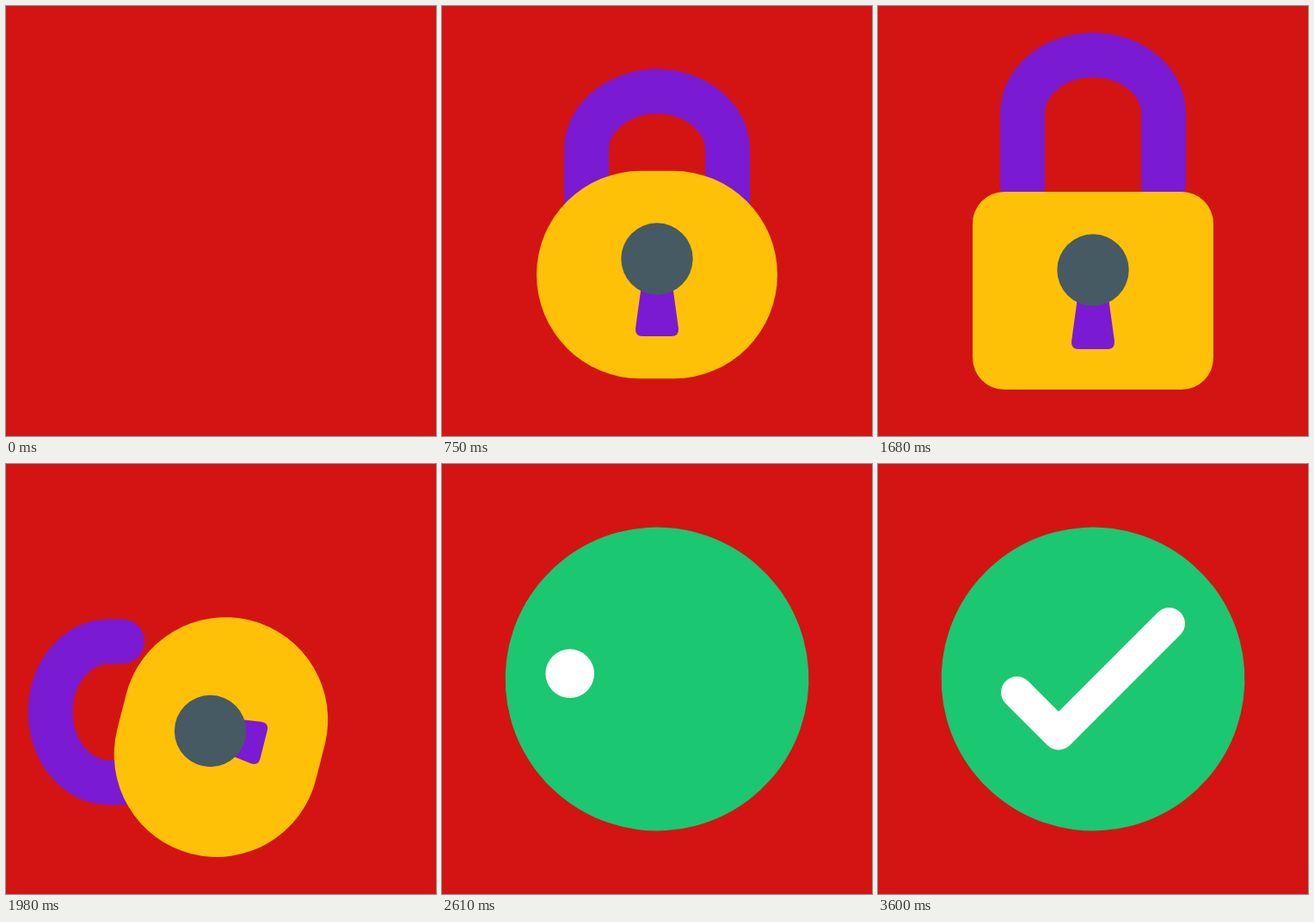
An HTML page that plays this animation: 500 px wide and 500 px high, repeating every 4260 ms.

```html
<!DOCTYPE html>
<html lang="en">
<head>
<meta charset="utf-8">
<title>Unlock</title>
<style>
  html, body { margin: 0; width: 100%; height: 100%; overflow: hidden; background: #d31413; }
  svg { display: block; width: 100%; height: 100%; }
</style>
</head>
<body>
<svg viewBox="0 0 500 500">
  <defs>
    <clipPath id="clip"><rect id="clipRect"/></clipPath>
  </defs>
  <rect width="500" height="500" fill="#d31413"/>
  <circle id="ripple" cx="250" cy="250" fill="#1bc771"/>
  <g id="lock">
    <path id="shackle" d="M-82 85V0A82 68 0 0 1 82 0V85" pathLength="1" fill="none"
          stroke="#7b1ad3" stroke-width="52" stroke-linecap="round"/>
    <rect id="body"/>
    <g clip-path="url(#clip)">
      <path id="glint" d="M15.5 -115H63.5L-15.5 115H-63.5Z" fill="#fff" opacity=".33"/>
    </g>
  </g>
  <path id="slot" d="M-17 25H17L25 83Q25.500 92 17 92H-17Q-25.500 92 -25 83Z" fill="#7b1ad3"/>
  <circle id="hole"/>
  <path id="check" d="M161.500 265.500L210 314L338.500 185.500" pathLength="1" fill="none" stroke="#fff"
        stroke-width="37" stroke-linecap="round" stroke-linejoin="round"/>
</svg>
<script>
const LOOP = 4260;
const YELLOW = [255, 193, 7], GREEN = [27, 199, 113];
const SLATE = [70, 90, 99], WHITE = [255, 255, 255];

const el = {};
document.querySelectorAll('svg [id]').forEach(node => { el[node.id] = node; });

const lerp = (a, b, p) => a + (b - a) * p;
const mix = (a, b, p) => `rgb(${a.map((v, i) => Math.round(lerp(v, b[i], p)))})`;
const set = (node, attrs) => {
  for (const key in attrs) node.setAttribute(key, attrs[key]);
};
const show = (node, on) => set(node, { visibility: on ? 'visible' : 'hidden' });

function draw(t) {
  const span = (a, b) => Math.min(1, Math.max(0, (t - a) / (b - a)));
  const ease = (a, b) => (1 - Math.cos(Math.PI * span(a, b))) / 2;

  const form = ease(300, 960);
  const morph = form * (1 - ease(1816, 2433));
  const spin = -105 * ease(1680, 2146);
  const scale = ease(30, 390) * (1 + 0.26 * ease(2150, 2510));
  const tint = ease(2140, 2510);

  // Body
  const y = 81 * morph;
  const h = lerp(280, 230, morph);
  const round = lerp(lerp(600, 37, form), 140, ease(1740, 1920));
  const box = { x: -140, y: -h / 2, width: 280, height: h, rx: Math.min(h / 2, round) };
  set(el.body, { ...box, fill: mix(YELLOW, GREEN, tint) });
  set(el.clipRect, box);
  set(el.lock, { transform: `translate(250 250) scale(${scale}) translate(0 ${y}) rotate(${spin})` });
  show(el.lock, scale > 0);

  // Shackle
  const sink = ease(1740, 2220);
  const rise = -7 - 179 * form - 20 * ease(1500, 1650) + 144 * sink;
  const trim = 1 - ease(1865, 2295);
  set(el.shackle, {
    transform: `translate(${-8 * sink} ${rise}) rotate(${-15 * ease(1680, 1980)})`,
    'stroke-dasharray': `${trim} 2`
  });
  show(el.shackle, t > 390 && trim > 0.01);

  // Glint
  set(el.glint, { transform: `translate(${lerp(-205, 205, ease(1140, 1670))} 0)` });
  show(el.glint, t > 1140 && t < 1670);

  // Keyhole, later the dot that starts the check mark
  const pull = ease(1790, 2190);
  const arm = 24 * form * (1 - pull);
  const rad = spin * Math.PI / 180;
  const drop = 81 * form * (1 - ease(1828, 2328));
  const slide = ease(2330, 2610), settle = ease(2610, 2760);
  const hx = lerp(lerp(250 + scale * arm * Math.sin(rad), 148.7, slide), 150.5, settle);
  const hy = lerp(lerp(250 + scale * (drop - arm * Math.cos(rad)), 243.7, slide), 269.5, settle);
  const size = 41.7 * scale * ease(150, 440);
  set(el.hole, {
    cx: hx, cy: hy,
    r: lerp(size, 18.5, ease(2330, 2770)),
    fill: mix(SLATE, WHITE, tint)
  });
  show(el.hole, t < 2780);

  const tuck = -60 * (1 - ease(440, 791) * (1 - pull));
  set(el.slot, { transform: `translate(${hx} ${hy}) rotate(${spin}) translate(0 ${tuck})` });
  show(el.slot, t > 440 && t < 2190);

  // Check mark
  const shift = 1 - ease(3270, 3500);
  set(el.check, {
    transform: `translate(${-11 * shift} ${4 * shift})`,
    'stroke-dasharray': `${Math.max(0.001, ease(2780, 3455))} 2`
  });
  show(el.check, t >= 2780);

  // Ripple
  const wave = span(3280, 3600);
  const spread = 1 - (1 - wave) ** 2;
  set(el.ripple, { r: lerp(176, 238, spread), opacity: 0.6 * (1 - wave) });
  show(el.ripple, wave > 0 && wave < 1);
}

const start = performance.now();
function tick() {
  draw((performance.now() - start) % LOOP);
  requestAnimationFrame(tick);
}
tick();
</script>
</body>
</html>
```
